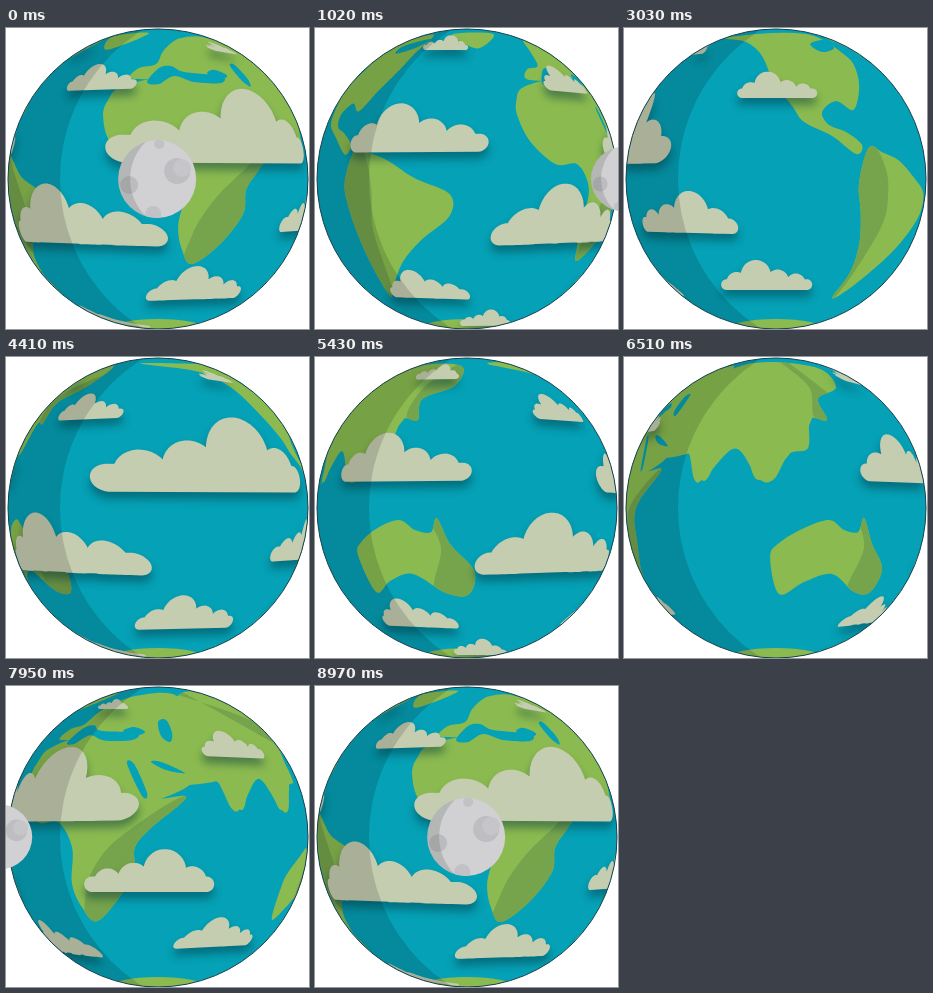
An HTML page with a canvas that plays this animation: 303 by 301 pixels, repeating every 9000 ms.

```html
<!DOCTYPE html>
<html lang="en">
<head>
<meta charset="utf-8">
<title>Spinning globe</title>
<style>
html, body { margin: 0; width: 100%; height: 100%; overflow: hidden; background: #fff; }
canvas { display: block; width: 303px; height: 301px; }
</style>
</head>
<body>
<canvas id="stage" width="303" height="301"></canvas>
<script>
const ctx = document.getElementById('stage').getContext('2d');
const LOOP = 9000, TURN = 8970, TAU = Math.PI * 2, OMEGA = TAU / TURN;
const CX = 152, CY = 151, R = 150;
const EYE = 10, FOCAL = Math.sqrt(EYE * EYE - 1);
const SEA = '#05a1b6', GREEN = '#8bbb50', DARK = '#76a44c', CLOUD = '#c5cdb0';
const lands = [], clouds = [];

// Screen point to longitude and latitude on the sphere, and back.
function unproject(x, y) {
  const u = (x - CX) / R / FOCAL, v = (y - CY) / R / FOCAL, q = 1 + u * u + v * v;
  const w = (EYE - Math.sqrt(Math.max(0, EYE * EYE - q * FOCAL * FOCAL))) / q;
  return { lon: Math.atan2(u * w, EYE - w), lat: Math.asin(Math.max(-1, Math.min(1, v * w))) };
}

function project(lon, lat) {
  const hidden = Math.abs(lon) > Math.PI / 2;
  if (hidden) lon = Math.sign(lon) * Math.PI / 2;
  const c = Math.cos(lat);
  const s = R * FOCAL / (EYE - c * Math.cos(lon)) * (hidden ? 1.03 : 1);
  return { x: CX + c * Math.sin(lon) * s, y: CY + Math.sin(lat) * s, hidden };
}

function sphere(list) {
  const out = [];
  for (let i = 0; i < list.length; i += 2) out.push(unproject(list[i], list[i + 1]));
  return out;
}

// Key points are given as they look on screen at time t; the fold is the darker side.
function land(t, outline, fold = [], color = GREEN) {
  lands.push({ t, color, outline: sphere(outline), fold: sphere(fold) });
}

function sea(t, outline) {
  land(t, outline, [], SEA);
}

// Rounded outline between x0 and x1 that never goes below the base line.
function blob(x0, x1, y, r, base) {
  const list = [];
  for (let i = 0; i < 36; i++) {
    const a = (i + 0.5) * TAU / 36, c = Math.cos(a);
    list.push((c > 0 ? x1 : x0) + r * c, Math.min(base, y + r * Math.sin(a)));
  }
  return sphere(list);
}

// Every cloud is one pill with four bumps, scaled by its width.
function cloud(t, left, base, width, flip = false) {
  const height = width * 0.33, r = height * 0.18;
  const rings = [blob(left + r, left + width - r, base - r, r, base)];
  for (const [at, top] of [[0.18, 0.55], [0.38, 0.68], [0.62, 1], [0.83, 0.6]]) {
    const x = left + width * (flip ? 1 - at : at);
    const bump = height * (0.1 + 0.4 * top);
    rings.push(blob(x, x, base - height * top + bump, bump, base));
  }
  clouds.push({ t, rings });
}

// Africa
land(0, [97,88, 102,72, 115,59, 160,50, 222,62, 243,98, 255,113, 272,113, 252,143, 240,162,
  237,186, 214,216, 186,236, 176,222, 172,198, 178,162, 160,136, 130,136, 104,114],
  [275,110, 236,144, 208,172, 186,207, 180,245, 250,240, 290,150]);
// Europe
land(0, [124,50, 133,40, 150,36, 158,22, 175,10, 205,12, 240,45, 268,70, 285,95, 255,100,
  235,75, 200,58, 150,52]);
// Western Asia
land(7950, [124,79, 140,106, 150,114, 185,97, 165,80, 205,88, 226,123, 236,120, 250,94, 262,100,
  275,124, 283,100, 270,60, 225,20, 150,10, 110,30, 105,60]);
// Eastern Asia
land(6510, [48,80, 66,98, 80,124, 97,97, 115,93, 135,122, 150,122, 165,97, 184,91, 186,62,
  203,63, 194,42, 212,30, 190,10, 120,8, 60,45],
  [150,0, 185,30, 192,62, 230,60, 230,0]);
// Mediterranean, Black, Caspian and Red Sea, Persian Gulf
sea(0, [141,54, 153,40, 165,38, 178,44, 215,48, 215,55, 188,54, 168,48, 153,56]);
sea(7950, [117,45, 128,41, 139,46, 128,50]);
sea(7950, [152,36, 160,34, 166,47, 164,56, 155,50]);
sea(7950, [121,78, 128,78, 141,107, 136,110]);
sea(7950, [145,76, 155,76, 179,87, 160,84]);
// Australia
land(6510, [146,200, 155,186, 178,172, 205,163, 220,173, 234,175, 240,161, 248,187, 258,212,
  246,235, 230,235, 208,217, 180,225, 155,237],
  [232,150, 240,190, 222,240, 270,240, 270,160]);
// North America with Hudson Bay, Greenland
land(3030, [98,10, 122,14, 138,28, 150,55, 168,78, 180,94, 208,108, 232,126, 238,117, 222,104,
  205,97, 198,84, 212,73, 229,82, 235,62, 232,42, 222,28, 190,8, 150,5]);
sea(3030, [186,16, 200,12, 210,20, 198,24]);
land(1020, [138,6, 178,6, 165,20, 150,16]);
// South America
land(2000, [136,119, 155,124, 180,132, 210,150, 241,166, 238,188, 208,212, 180,235, 150,262,
  136,271, 137,245, 133,215, 126,185, 121,155],
  [136,110, 155,135, 161,165, 156,205, 138,275, 100,270, 100,120]);

cloud(340, 112, 61, 80, true);
cloud(510, 71, 217, 186, true);
cloud(1020, 108, 22, 45);
cloud(1020, 145, 298, 50);
cloud(1275, 77, 124, 150, true);
cloud(1290, 109, 271, 86, true);
cloud(3030, 97, 262, 91, true);
cloud(3030, 113, 70, 80, true);
cloud(7950, 92, 23, 30);
cloud(7950, 78, 206, 130);
cloud(8622, 37, 135, 230);
cloud(8700, 101, 272, 102, true);

function place(points, turn) {
  turn = Math.atan2(Math.sin(turn), Math.cos(turn));
  const seen = points.map(p => project(p.lon + turn, p.lat));
  return seen.every(p => p.hidden) ? null : seen;
}

// Closed curve through all points.
function smooth(p) {
  const n = p.length, at = i => p[(i + n) % n];
  ctx.beginPath();
  ctx.moveTo(p[0].x, p[0].y);
  for (let i = 0; i < n; i++) {
    const a = at(i - 1), b = at(i), c = at(i + 1), d = at(i + 2);
    ctx.bezierCurveTo(b.x + (c.x - a.x) / 6, b.y + (c.y - a.y) / 6,
      c.x - (d.x - b.x) / 6, c.y - (d.y - b.y) / 6, c.x, c.y);
  }
}

function disc(x, y, r, color) {
  ctx.beginPath();
  ctx.arc(x, y, r, 0, TAU);
  ctx.fillStyle = color;
  ctx.fill();
}

// Darkens everything in the clip outside the given circle.
function shade(x, y, r, color) {
  ctx.beginPath();
  ctx.rect(-500, -500, 1500, 1500);
  ctx.moveTo(x + r, y);
  ctx.arc(x, y, r, 0, TAU);
  ctx.fillStyle = color;
  ctx.fill('evenodd');
}

function drawLand(l, time) {
  const turn = OMEGA * (time - l.t), outline = place(l.outline, turn);
  if (!outline) return;
  ctx.save();
  smooth(outline);
  ctx.fillStyle = l.color;
  ctx.fill();
  const fold = l.fold.length && place(l.fold, turn);
  if (fold) {
    ctx.clip();
    smooth(fold);
    ctx.fillStyle = DARK;
    ctx.fill();
  }
  ctx.restore();
}

function drawCloud(c, time) {
  ctx.beginPath();
  for (const points of c.rings) {
    const seen = place(points, 2 * OMEGA * (time - c.t));
    if (!seen) continue;
    seen.forEach((p, i) => i ? ctx.lineTo(p.x, p.y) : ctx.moveTo(p.x, p.y));
    ctx.closePath();
  }
  ctx.fill();
}

function drawMoon(angle) {
  if (Math.cos(angle) < 0) return;
  const size = 0.3 + 0.7 * Math.cos(angle);
  ctx.save();
  ctx.translate(CX - 1 + 240 * Math.sin(angle), CY);
  ctx.scale(size, size);
  disc(0, 0, 39, '#d1d1d4');
  ctx.clip();
  disc(20, -8, 13, '#bebec2');
  disc(25, -11, 9, '#c6c6ca');
  disc(-28, 6, 9, '#bcbcc0');
  disc(-4, 35, 8, '#c2c2c6');
  disc(2, -35, 5, '#c2c2c6');
  shade(25, 0, 52, 'rgba(70,75,60,.2)');
  ctx.restore();
}

function draw(time) {
  ctx.clearRect(0, 0, 303, 301);
  ctx.save();
  disc(CX, CY, R, SEA);
  ctx.clip();
  for (const l of lands) drawLand(l, time);
  ctx.beginPath();
  ctx.ellipse(CX, 301, 48, 10, 0, 0, TAU);
  ctx.fillStyle = GREEN;
  ctx.fill();

  ctx.save();
  ctx.fillStyle = CLOUD;
  ctx.shadowColor = 'rgba(0,50,60,.45)';
  ctx.shadowBlur = 8;
  ctx.shadowOffsetY = 7;
  for (const c of clouds) drawCloud(c, time);
  ctx.restore();

  shade(230, CY, 176, 'rgba(0,0,0,.14)');
  ctx.restore();
  ctx.beginPath();
  ctx.arc(CX, CY, R, 0, TAU);
  ctx.strokeStyle = '#173f4c';
  ctx.lineWidth = 1;
  ctx.stroke();
  drawMoon(OMEGA * time);
}

const start = performance.now();
function tick() {
  draw((performance.now() - start) % LOOP);
  requestAnimationFrame(tick);
}
tick();
</script>
</body>
</html>
```
